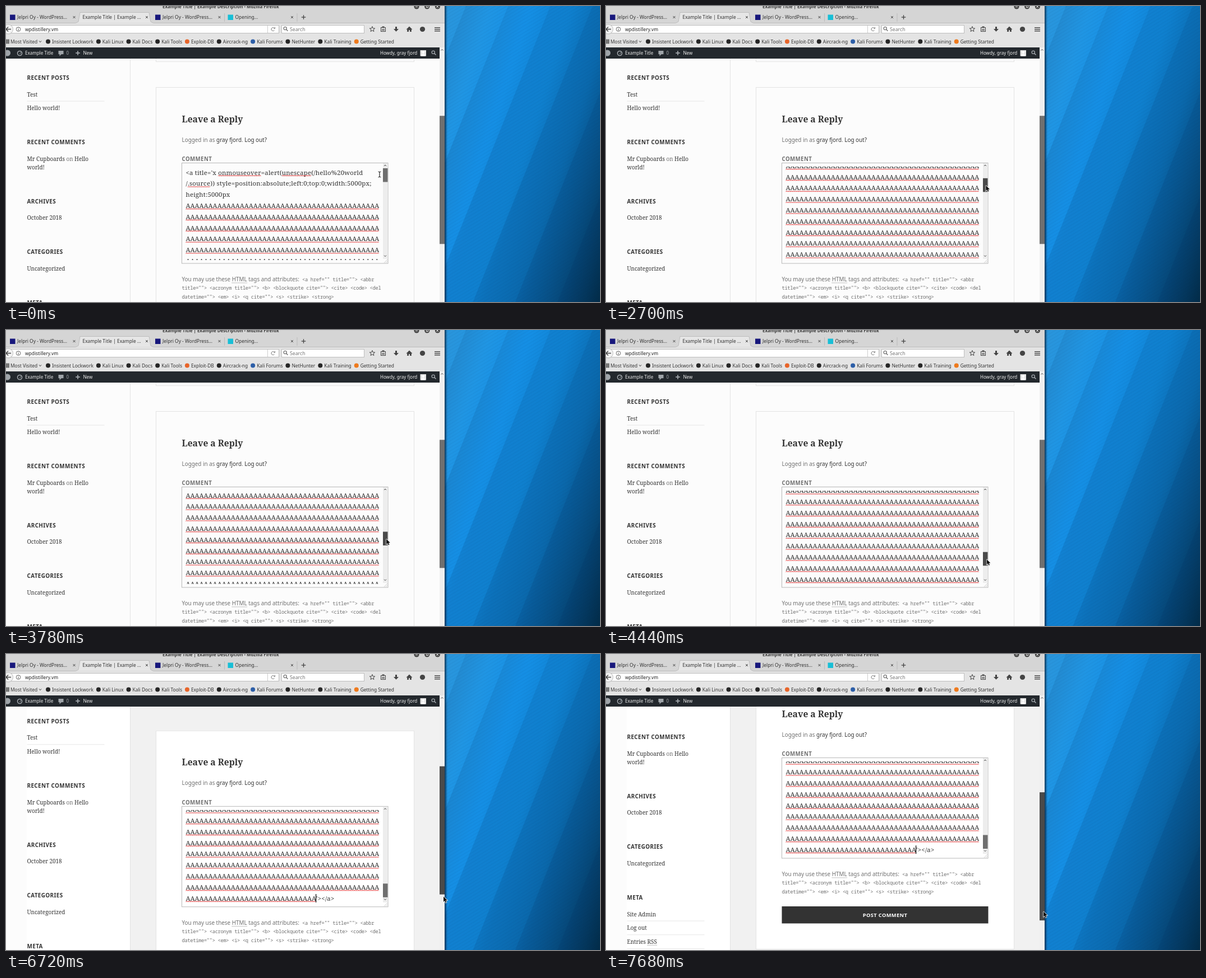
Write an HTML page with a canvas that moves like this. It is 1059 by 529 pixels and loops after 8000 ms.

```html
<!DOCTYPE html>
<html lang="en">
<head>
<meta charset="utf-8">
<title>Comment form</title>
<style>
html, body { margin: 0; width: 100%; height: 100%; overflow: hidden; background: #fcfcfc; }
canvas { display: block; }
</style>
</head>
<body>
<canvas id="stage" width="1059" height="529"></canvas>
<script>
const ctx = document.getElementById('stage').getContext('2d');
const H = 529, LOOP = 8000, TICK = 134.5;
const SANS = '"Noto Sans", sans-serif', SERIF = '"Noto Serif", serif', MONO = '"Noto Sans Mono", monospace';
const UI = '8.4px ' + SANS, BAR = '8px ' + SANS, BODY = '9.9px ' + SANS, SIDE = '9.9px ' + SERIF;
const CAPS = 'bold 9.9px ' + SANS, FIELD = '11.38px ' + SERIF;
const INK = '#333', SOFT = '#707070', ICON = '#444', IDLE = '#6f6f6f', HELD = '#4a4a4a';

const USER = 'gray fjord';
const ROW = 19.8, ROWS = 56, MAX_SCROLL = ROWS * ROW - 167;

// ---- Motion: everything moves in ticks ----

function progress(n, a, b) {
  return Math.min(1, Math.max(0, (n - a) / (b - a)));
}

function mix(p, q, k) {
  return p.map((v, i) => v + (q[i] - v) * k);
}

function curve(p, q, r, s, k) {
  const u = 1 - k;
  return p.map((v, i) => u * u * u * v + 3 * u * u * k * q[i] + 3 * u * k * k * r[i] + k * k * k * s[i]);
}

// Scrolls slowly at first, then faster towards the end
function fieldScroll(n) {
  return 304.3 * progress(n, 17, 24) + (MAX_SCROLL - 304.3) * progress(n, 24, 36);
}

function pageScroll(n) {
  return 95 * progress(n, 48, 57) ** 1.63;
}

function thumbTop(n) {
  return 290 + fieldScroll(n) / MAX_SCROLL * 128.5;
}

function pointerAt(n) {
  const rest = [666, 301], left = [331, 383], right = [632, 387];
  const grip = [677 + (thumbTop(n) - 290) / 64, thumbTop(n) + 13];
  const below = [680, 455], bar = [780, 431 + 0.307 * pageScroll(n)];
  if (n <= 8) return curve(rest, [560, 220], [240, 235], left, n / 8);
  if (n <= 11) return mix(left, right, progress(n, 8, 10));
  if (n <= 36) return mix(right, grip, progress(n, 11, 15));
  if (n <= 41) return mix(grip, below, progress(n, 36, 41));
  return mix(below, bar, 1 - (1 - progress(n, 41, 47)) ** 2.5);
}

// ---- Drawing helpers ----

function rect(x, y, w, h, fill) {
  ctx.fillStyle = fill;
  ctx.fillRect(x, y, w, h);
}

function frame(x, y, w, h, color) {
  ctx.strokeStyle = color;
  ctx.lineWidth = 1;
  ctx.strokeRect(x, y, w, h);
}

function disc(x, y, r, fill) {
  ctx.fillStyle = fill;
  ctx.beginPath();
  ctx.arc(x, y, r, 0, 7);
  ctx.fill();
}

function ring(x, y, r, color, width = 1, from = 0, to = 7) {
  ctx.strokeStyle = color;
  ctx.lineWidth = width;
  ctx.beginPath();
  ctx.arc(x, y, r, from, to);
  ctx.stroke();
}

function trace(points) {
  ctx.beginPath();
  for (let i = 0; i < points.length; i += 2) ctx.lineTo(points[i], points[i + 1]);
}

function line(points, color, width = 1) {
  ctx.strokeStyle = color;
  ctx.lineWidth = width;
  trace(points);
  ctx.stroke();
}

function poly(points, fill) {
  ctx.fillStyle = fill;
  trace(points);
  ctx.fill();
}

// Draws text on a baseline and returns its right end
function text(str, x, y, font, color, spacing = 0) {
  ctx.font = font;
  ctx.letterSpacing = spacing + 'px';
  ctx.fillStyle = color;
  ctx.fillText(str, x, y);
  const end = x + ctx.measureText(str).width;
  ctx.letterSpacing = '0px';
  return end;
}

function clip(x, y, w, h, draw) {
  ctx.save();
  ctx.beginPath();
  ctx.rect(x, y, w, h);
  ctx.clip();
  draw();
  ctx.restore();
}

function chevron(x, y, dir) {
  line([x - 2, y + dir, x, y - dir, x + 2, y + dir], ICON);
}

function cross(x, y, color = ICON) {
  line([x - 2, y - 2, x + 2, y + 2], color);
  line([x - 2, y + 2, x + 2, y - 2], color);
}

function plus(x, y, r, color, width) {
  line([x - r, y, x + r, y], color, width);
  line([x, y - r, x, y + r], color, width);
}

function lens(x, y, color) {
  ring(x - 0.8, y - 0.8, 2.6, color, 1.3);
  line([x + 1, y + 1, x + 4, y + 4], color, 1.6);
}

function dotted(x1, x2, y) {
  ctx.setLineDash([1, 1]);
  line([x1, y, x2, y], '#777', 0.9);
  ctx.setLineDash([]);
}

function squiggle(x1, x2, y) {
  const pts = [];
  for (let x = x1, up = 1; x <= x2; x += 1.41, up = -up) pts.push(x, y + up * 0.8);
  line(pts, '#e02a2a', 0.95);
}

// ---- Desktop ----

function drawDesktop() {
  clip(782, 0, 277, H, () => {
    ctx.translate(782, 0);
    ctx.rotate(0.314);
    const sky = ctx.createLinearGradient(0, 0, 427, 0);
    const tones = ['#2b95da', '#2196e3', '#1590e6', '#0f81d0', '#0a69ad', '#064a7c', '#022b47'];
    tones.forEach((tone, i) => sky.addColorStop(i / (tones.length - 1), tone));
    rect(-10, -140, 470, 720, sky);
    // Slanted sheets that fan out slightly
    for (let x = 20; x < 440; x += 70) {
      const sheet = ctx.createLinearGradient(x, 0, x + 60, 0);
      sheet.addColorStop(0, 'rgba(0,40,90,.13)');
      sheet.addColorStop(1, 'rgba(0,40,90,0)');
      poly([x + 25, -140, x + 85, -140, x + 50, 580, x - 25, 580], sheet);
    }
    ctx.rotate(-0.314);
    for (let y = 0; y < 700; y += 6) line([0, y, 277, y - 165], 'rgba(0,40,90,.05)', 1.2);
  });
  const shade = ctx.createLinearGradient(782, 0, 787, 0);
  shade.addColorStop(0, 'rgba(0,15,35,.7)');
  shade.addColorStop(1, 'rgba(0,15,35,0)');
  rect(782, 0, 5, H, shade);
}

// ---- Browser ----

function drawTabs() {
  rect(0, 0, 782, 74, '#d5d5d5');
  text('Example Title | Example Description - Mozilla Firefox', 279, 3.5, 'bold 7.95px ' + SANS, '#3b3b3b');
  for (let i = 0; i < 3; i++) disc(732 + i * 18.7, 1, 4.6, '#4a4a4a');
  line([730, 1.5, 734, 1.5], '#ddd');
  frame(749.5, -0.5, 3, 3, '#ddd');
  cross(769, 1, '#ddd');

  const tab = [0, 30.5, 124, 30.5, 129, 28, 132, 11.5, 255, 11.5, 258, 28, 263, 30.5, 782, 30.5];
  poly(tab.slice(2, -2), '#e6e6e6');
  line(tab, '#b5b5b5', 0.8);
  const names = ['Jelpri Oy - WordPress...', 'Example Title | Example ...', 'Jelpri Oy - WordPress...', 'Opening...'];
  const icons = ['#17177c', null, '#17177c', '#18bfd6'];
  names.forEach((name, i) => {
    const x = 7 + i * 129.5;
    if (icons[i]) rect(x, 15.5, 9.5, 9.5, icons[i]);
    text(name, icons[i] ? x + 13 : x, 23.3, UI, INK);
    cross(x + 114.5, 20);
    if (i > 1) line([x + 123.5, 13, x + 123.5, 28], '#bababa');
  });
  plus(530.5, 20, 3.8, ICON, 1.3);
}

function drawInput(x, w) {
  rect(x, 34, w, 14.5, '#fff');
  frame(x + 0.5, 34.5, w - 1, 14, '#bdbdbd');
}

function drawToolbar() {
  rect(0, 31, 782, 43, '#e4e4e4');
  drawInput(8, 479);
  disc(4, 41.5, 8.5, '#f3f3f3');
  ring(4, 41.5, 8.5, '#aaa', 0.8);
  line([9, 41.5, 0, 41.5], ICON, 1.5);
  line([4, 37.5, 0, 41.5, 4, 45.5], ICON, 1.5);
  ring(22, 41.5, 3.8, '#555', 0.9);
  rect(21.5, 41, 1, 3, '#555');
  rect(21.5, 39, 1, 1, '#555');
  text('wpdistillery.vm', 34, 44.5, UI, '#222');
  line([466.5, 35, 466.5, 48], '#ccc');
  ring(476, 41.5, 3, '#777', 1, 0.6, 5.6);
  poly([477, 40.5, 480, 37.5, 480, 40.5], '#777');

  drawInput(491, 148);
  lens(498.5, 40.8, '#777');
  text('Search', 506, 44.6, '8.7px ' + SANS, '#777');

  const star = [];
  for (let i = 0; i <= 10; i++) {
    const r = i % 2 ? 2.1 : 5, a = i * Math.PI / 5 - Math.PI / 2;
    star.push(653 + r * Math.cos(a), 41.5 + r * Math.sin(a));
  }
  line(star, ICON);
  frame(668.5, 38.5, 8, 7, ICON);
  rect(670.5, 36.5, 4, 2.5, ICON);
  rect(670, 41, 5, 1, ICON);
  rect(670, 43, 5, 1, ICON);
  rect(694, 37, 3, 4.5, ICON);
  poly([691, 41, 700, 41, 695.5, 45.8], ICON);
  poly([713.5, 42, 719, 36.5, 724.5, 42], ICON);
  rect(715.2, 41, 2.8, 5, ICON);
  rect(720, 41, 2.8, 5, ICON);
  rect(716, 41, 6, 2, ICON);
  disc(742.5, 41.5, 4.6, ICON);
  for (let y = 38; y < 46; y += 3) rect(764, y, 10, 1.4, ICON);
  drawBookmarks();
}

function drawBookmarks() {
  rect(0, 59.5, 6, 8, '#777');
  text('Most Visited', 8, 66.5, UI, INK);
  chevron(61, 63.5, -1.3);
  const names = ['Insistent Lockwork', 'Kali Linux', 'Kali Docs', 'Kali Tools', 'Exploit-DB', 'Aircrack-ng',
    'Kali Forums', 'NetHunter', 'Kali Training', 'Getting Started'];
  const tints = { 'Exploit-DB': '#e8652a', 'Kali Forums': '#2d5fa8', 'Getting Started': '#ee7a1d' };
  let x = 82;
  for (const name of names) {
    disc(x - 7, 63.5, 4, tints[name] || '#262626');
    x = text(name, x, 66.5, UI, INK) + 16;
  }
}

// ---- Page ----

function drawAdminBar() {
  const pale = '#a0a5aa', light = '#eee';
  rect(0, 74, 773, 20, '#23282d');
  disc(2.5, 84, 5.5, pale);
  ring(24.5, 84.5, 4, pale, 1.6);
  line([24.5, 86, 26.5, 82.5], pale);
  text('Example Title', 34, 87, BAR, light);
  rect(93.5, 80, 9, 6.2, pale);
  poly([95.5, 86, 99, 86, 95.5, 89.5], pale);
  text('0', 107.5, 87, BAR, pale);
  plus(128, 84, 3.8, pale, 1.8);
  text('New', 137.5, 87, BAR, light);
  text('Howdy, ' + USER, 667, 87, BAR, light);
  rect(738.5, 79, 10.5, 10.5, '#e6e6e6');
  disc(743.8, 83, 2.2, '#fff');
  poly([740, 89.5, 741.5, 86, 746, 86, 747.5, 89.5], '#fff');
  lens(762.5, 83.5, pale);
}

const OPENING = [
  "<a title='x ~onmouseover~=alert(~unescape~(/hello%20world",
  '/~.source~)) style=position:absolute;left:0;top:0;width:5000px;',
  'height:5000px'
];

function rowText(i) {
  if (i < OPENING.length) return OPENING[i];
  return i < ROWS - 1 ? '~' + 'A'.repeat(43) + '~' : '~' + 'A'.repeat(29) + "~'></a>";
}

// Splits on ~ : every second part is marked as misspelt
function fieldRow(str, y) {
  let x = 320.5;
  str.split('~').forEach((part, i) => {
    const end = text(part, x, y + 4, FIELD, INK, part[0] === 'A' ? 0 : 0.2);
    if (i % 2) squiggle(x, end, y + 5.8);
    x = end;
  });
}

function drawField(n, paper) {
  const scroll = fieldScroll(n);
  const rowY = i => 297.5 + i * ROW - scroll;
  rect(313, 280, 368, 180, paper);
  frame(313.5, 280.5, 367.5, 179.5, '#b8b8b8');
  clip(314, 287, 358, 167, () => {
    const first = Math.max(0, Math.floor(scroll / ROW) - 1);
    for (let i = first; i < Math.min(ROWS, first + 12); i++) fieldRow(rowText(i), rowY(i));
    const caretOn = n > 36 && (n * TICK + 725) % 1000 < 500;
    if (caretOn) rect(552, rowY(ROWS - 1) - 7.5, 1.2, 15, '#000');
  });
  rect(672, 281, 8.5, 171, '#ededed');
  rect(672, thumbTop(n), 8.5, 24.5, n >= 15 && n < 38 ? HELD : IDLE);
  chevron(676, 285, 1);
  chevron(676, 446.7, -1);
  line([674, 459, 680, 453], '#c4c4c4', 0.8);
  line([677, 459, 680, 456], '#c4c4c4', 0.8);
}

// Each part is [text, muted]; returns the right end
function runs(parts, x, y, font) {
  for (const [str, muted] of parts) x = text(str, x, y, font, muted ? SOFT : INK);
  return x;
}

function drawSidebar() {
  const x = 37.5;
  const sections = {
    'RECENT POSTS': ['Test', 'Hello world!'],
    'RECENT COMMENTS': [null],
    'ARCHIVES': ['October 2018'],
    'CATEGORIES': ['Uncategorized'],
    'META': ['Site Admin', 'Log out', 'Entries RSS', '']
  };
  let y = 132;
  for (const [head, items] of Object.entries(sections)) {
    text(head, x, y, CAPS, INK, 0.4);
    y += 29.6;
    items.forEach((item, i) => {
      if (i) {
        y += 24.8;
        line([x, y - 16.4, x + 138, y - 16.4], '#e6e6e6');
      }
      if (item !== null) {
        const end = text(item, x, y, SIDE, INK);
        if (item.endsWith('RSS')) dotted(end - ctx.measureText('RSS').width, end, y + 2.2);
        return;
      }
      runs([['Mr Cupboards'], [' on ', true], ['Hello']], x, y, SIDE);
      y += 14.8;
      text('world!', x, y, SIDE, INK);
    });
    y += 61;
  }
}

function drawForm(n, paper) {
  const x = 313.5;
  text('Leave a Reply', x, 207.6, 'bold 15.6px ' + SERIF, INK);
  runs([['Logged in as ', true], [USER], ['. ', true], ['Log out?']], x, 242.6, BODY);
  text('COMMENT', x, 277, 'bold 9.7px ' + SANS, SOFT, 0.4);
  drawField(n, paper);

  const start = text('You may use these ', x, 492.3, BODY, SOFT);
  const end = text('HTML', start, 492.3, BODY, SOFT);
  dotted(start, end, 494.8);
  text(' tags and attributes:', end, 492.3, BODY, SOFT);
  const code = [
    '<a href="" title=""> <abbr',
    'title=""> <acronym title=""> <b> <blockquote cite=""> <cite> <code> <del',
    'datetime=""> <em> <i> <q cite=""> <s> <strike> <strong>'
  ];
  code.forEach((str, i) => text(str, i ? x : 528, 491.8 + i * 15.5, '8.8px ' + MONO, SOFT, -0.35));

  rect(x, 546, 368, 30.5, INK);
  ctx.textAlign = 'center';
  text('POST COMMENT', 497.5, 565, 'bold 9.3px ' + SANS, '#fff', 0.37);
  ctx.textAlign = 'left';
}

function drawCard(top, height, paper) {
  rect(267, top, 461, height, paper);
  frame(267.5, top + 0.5, 460, height - 1, '#e3e3e3');
}

function drawPage(n) {
  const scroll = pageScroll(n), moved = scroll > 0;
  const paper = moved ? '#fff' : '#fcfcfc';
  rect(0, 94, 773, 435, '#fcfcfc');
  if (moved) {
    rect(37, 94, 185, 435, '#fff');
    rect(222, 94, 551, 435, '#f1f1f1');
  }
  line([221.5, 94, 221.5, H], '#e3e3e3');
  clip(0, 94, 773, 435, () => {
    ctx.translate(0, -scroll);
    drawSidebar();
    drawCard(0, 100, paper);
    drawCard(145, 478, paper);
    drawForm(n, paper);
  });
  rect(773, 74, 9, 455, '#efefef');
  chevron(777.5, 78.5, 1);
  rect(773, 196.3 + scroll * 0.535, 9, 229, n >= 46 ? HELD : IDLE);
}

function drawPointer(n) {
  const [x, y] = pointerAt(n);
  if (x < 671 && x > 314 && y > 281 && y < 460) {
    for (const d of [-5, 5]) line([x - 2.5, y + d, x, y + d * 0.88, x + 2.5, y + d], '#222');
    line([x, y - 4.5, x, y + 4.5], '#222', 1.2);
    return;
  }
  const shape = [0, 0, 0, 9.5, 2.2, 7.5, 3.8, 11, 5.4, 10.2, 3.9, 6.9, 6.8, 6.7, 0, 0]
    .map((v, i) => v + (i % 2 ? y : x));
  line(shape, '#fff', 1.4);
  poly(shape, '#111');
}

let begin;
function render(now) {
  begin ??= now;
  const n = Math.floor((now - begin) % LOOP / TICK + 0.2);
  drawDesktop();
  drawTabs();
  drawToolbar();
  drawPage(n);
  drawAdminBar();
  drawPointer(n);
  requestAnimationFrame(render);
}
requestAnimationFrame(render);
</script>
</body>
</html>
```
